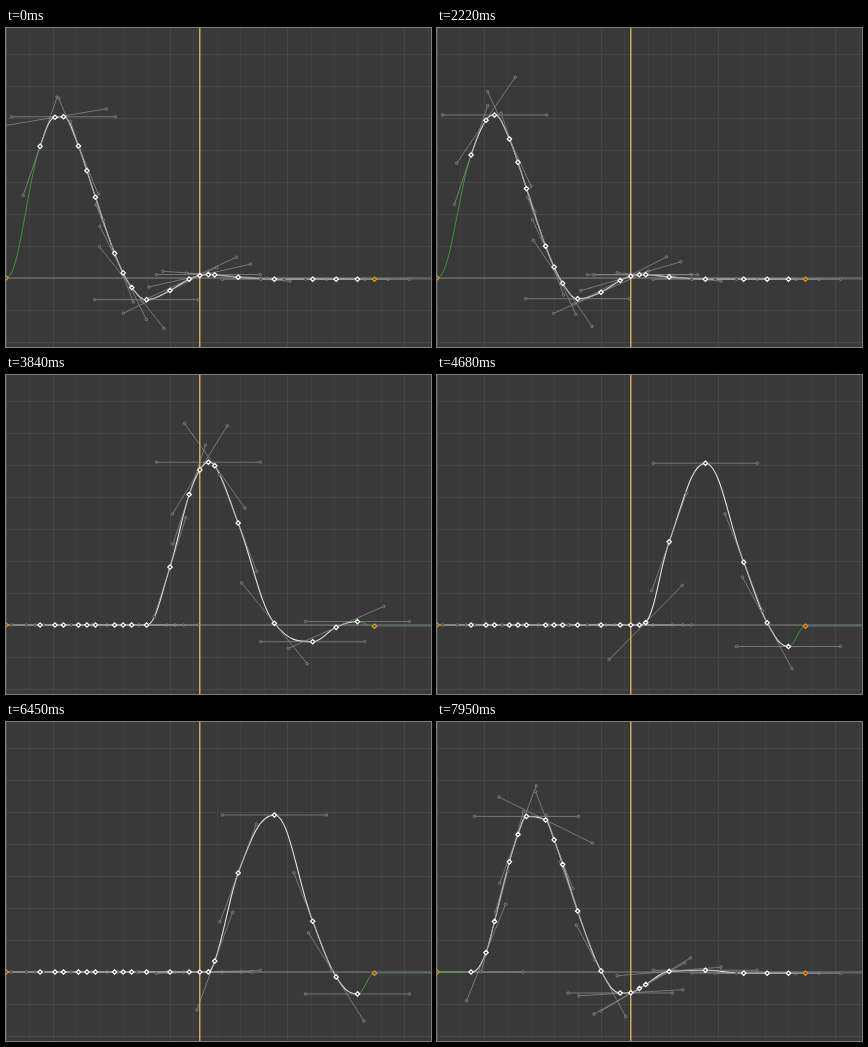
These frames come from a looping animation (425 by 319 pixels, 8000 ms). An HTML page with a canvas:

```html
<!DOCTYPE html>
<html lang="en">
<head>
<meta charset="utf-8">
<title>Curve editor</title>
<style>
  html, body { margin: 0; width: 100%; height: 100%; overflow: hidden; background: #39393a; }
  canvas { display: block; width: 425px; height: 319px; }
</style>
</head>
<body>
<canvas id="stage"></canvas>
<script>
const W = 425, H = 319, LOOP = 8000, STEP = 30;
const UNIT = 2.13;               // pixels per timeline unit
const BASE = 250, REST = 251.2;  // start and settled heights
const HANDLE = 52, REACH = 0.39;

const canvas = document.getElementById('stage');
const ctx = canvas.getContext('2d');
const ratio = window.devicePixelRatio || 1;
canvas.width = W * ratio;
canvas.height = H * ratio;
ctx.scale(ratio, ratio);

// Keys as timeline gaps; both ends stay put.
let unit = 0;
const keyX = [0, 16, 7, 4, 7, 4, 4, 9, 4, 4, 7, 11, 9, 5, 4, 3, 11, 17, 18, 11, 10, 8]
  .map(gap => (unit += gap) * UNIT);
const last = keyX.length - 1;
const isEnd = i => i === 0 || i === last;

// Extremes of the wave: [distance from the peak, y].
const extremes = [[-60, BASE], [0, 87], [89, 272], [148, 246.6], [211, REST]];

// Position of the peak: [ms, x].
const travel = [[0, 54.5], [2100, 54.5], [2880, 118.7], [3840, 204], [4680, 266],
  [5310, 282], [5700, 282], [6450, 262], [7950, 99.3], [8100, 83]];

function segment(pts, x) {
  const i = pts.findIndex(p => p[0] > x);
  return i < 0 ? pts.length : i;
}

// Each swing is a cosine ease that starts a little early.
function wave(x) {
  const i = segment(extremes, x);
  if (i === 0) return BASE;
  if (i === extremes.length) return REST;
  const [x0, y0] = extremes[i - 1], [x1, y1] = extremes[i];
  const t = ((x - x0) / (x1 - x0)) ** 0.82;
  return y0 + (y1 - y0) * (1 - Math.cos(Math.PI * t)) / 2;
}

// Auto-clamped tangent: flat at extremes, never past a neighbour.
function slopeAt(pts, i) {
  if (i === 0 || i === pts.length - 1) return 0;
  const [[x0, y0], [x1, y1], [x2, y2]] = pts.slice(i - 1, i + 2);
  const a = (y1 - y0) / (x1 - x0), b = (y2 - y1) / (x2 - x1);
  if (a * b <= 0) return 0;
  const limit = Math.min(Math.abs(a), Math.abs(b)) / REACH;
  return Math.sign(a) * Math.min(Math.abs(a + b) / 2, limit);
}

function peakAt(time) {
  const i = segment(travel, time);
  const [x0, y0] = travel[i - 1], [x1, y1] = travel[i];
  const h = x1 - x0, u = (time - x0) / h, v = 1 - u;
  return y0 * v * v * (1 + 2 * u) + y1 * u * u * (3 - 2 * u)
    + h * u * v * (slopeAt(travel, i - 1) * v - slopeAt(travel, i) * u);
}

function line(x0, y0, x1, y1, color, width = 1) {
  ctx.strokeStyle = color;
  ctx.lineWidth = width;
  ctx.beginPath();
  ctx.moveTo(x0, y0);
  ctx.lineTo(x1, y1);
  ctx.stroke();
}

function drawGrid() {
  ctx.fillStyle = '#39393a';
  ctx.fillRect(0, 0, W, H);
  for (let i = 0; i < 19; i++) {
    const x = 0.5 + Math.round(i * 11 * UNIT);
    line(x, 0, x, H, i % 5 === 2 ? '#464647' : '#404041');
  }
  for (let y = 26.5; y < 300; y += 32) line(0, y, W, y, '#474748');
  line(0, 314.5, W, 314.5, '#50444d');
  line(0.5, 0, 0.5, H, '#505050');
  line(0, BASE, W, BASE, '#808080');
}

function drawCurve(keys, slopes) {
  line(keys[last][0], REST, W, REST, '#4c6a4c');
  for (let i = 0; i < last; i++) {
    const [x0, y0] = keys[i], [x1, y1] = keys[i + 1];
    const d = (x1 - x0) * REACH;
    const outer = isEnd(i) || isEnd(i + 1);
    ctx.strokeStyle = outer ? '#3c943c' : '#e4e4e4';
    ctx.lineWidth = outer ? 1 : 1.1;
    ctx.beginPath();
    ctx.moveTo(x0, y0);
    ctx.bezierCurveTo(x0 + d, y0 + d * slopes[i], x1 - d, y1 - d * slopes[i + 1], x1, y1);
    ctx.stroke();
  }
}

function drawHandle([x, y], slope) {
  const dx = HANDLE / Math.hypot(1, slope), dy = dx * slope;
  line(x - dx, y - dy, x + dx, y + dy, 'rgba(150,150,150,.75)', 0.9);
  ctx.fillStyle = '#444';
  ctx.strokeStyle = '#868686';
  ctx.lineWidth = 0.8;
  for (const s of [-1, 1]) {
    ctx.beginPath();
    ctx.arc(x + s * dx, y + s * dy, 1.3, 0, 7);
    ctx.fill();
    ctx.stroke();
  }
}

function drawKey([x, y], color, fill) {
  const r = 2.2;
  ctx.beginPath();
  ctx.moveTo(x, y - r);
  ctx.lineTo(x + r, y);
  ctx.lineTo(x, y + r);
  ctx.lineTo(x - r, y);
  ctx.closePath();
  ctx.fillStyle = fill;
  ctx.fill();
  ctx.strokeStyle = color;
  ctx.lineWidth = 1.2;
  ctx.stroke();
}

function draw(time) {
  const peak = peakAt(time);
  const keys = keyX.map((x, i) => [x, i === 0 ? BASE : i === last ? REST : wave(x - peak)]);
  const slopes = keys.map((_, i) => slopeAt(keys, i));

  drawGrid();
  drawCurve(keys, slopes);
  keys.forEach((key, i) => { if (!isEnd(i)) drawHandle(key, slopes[i]); });
  line(193.75, 0, 193.75, H, '#cfa65c', 1.5);
  keys.forEach((key, i) => isEnd(i)
    ? drawKey(key, '#e09a20', '#5a4520')
    : drawKey(key, '#fff', '#444'));
}

const start = performance.now();
function tick() {
  const t = (performance.now() - start) % LOOP;
  draw(Math.floor(t / STEP) * STEP);
  requestAnimationFrame(tick);
}
tick();
</script>
</body>
</html>
```
